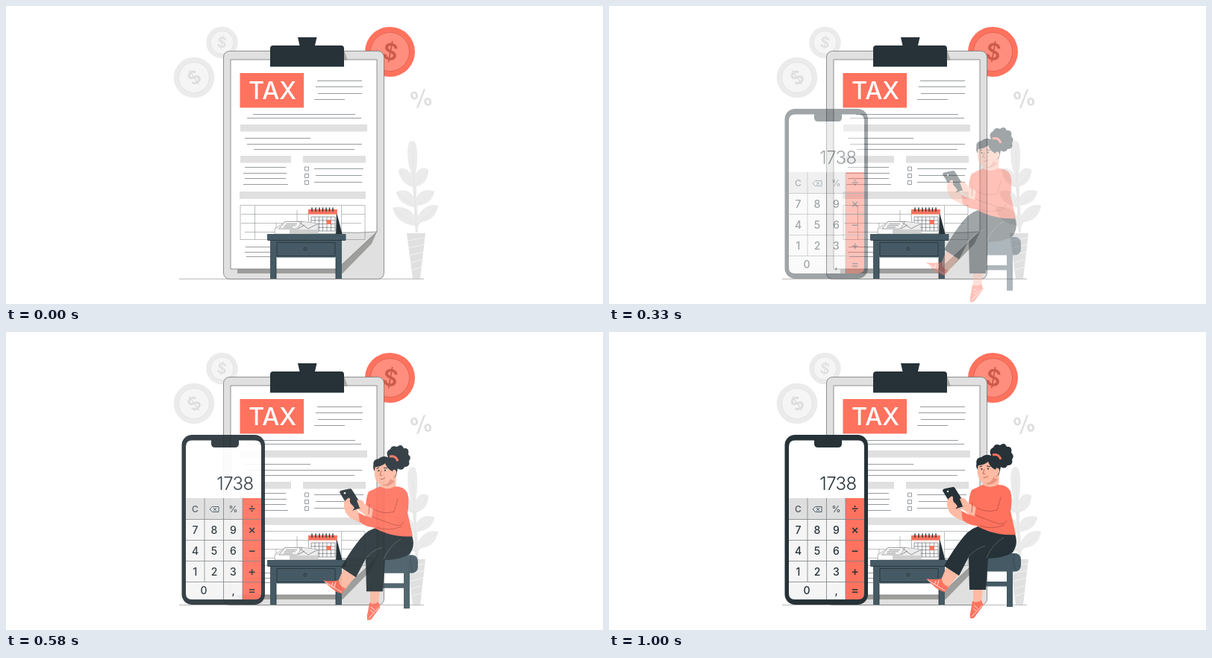
Write an HTML page that moves like this. It is 800 px wide and 400 px high and loops after 1040 ms.

```html
<!DOCTYPE html>
<html lang="en">
<head>
<meta charset="utf-8">
<title>Tax time</title>
<style>
html, body { margin: 0; width: 100%; height: 100%; overflow: hidden; background: #fff; }
svg { display: block; width: 800px; height: 400px; font-family: Inter, Lato, sans-serif; }
text { text-anchor: middle; }
.thin { fill: none; stroke: #6b7074; stroke-width: .7; }
.dark { fill: #263238; }
.red { fill: #ff725e; }
.slate { fill: #455a64; }
.skin { fill: #ffbaa3; }
.grey { fill: #e0e0e0; }
.pale { fill: #ebebeb; }
.fold { fill: none; stroke: #b94f42; stroke-width: .8; stroke-linecap: round; }
</style>
</head>
<body>
<svg viewBox="0 0 800 400">
  <!-- coins -->
  <g font-weight="600">
    <circle class="pale" cx="289.5" cy="49" r="21.3"/>
    <circle cx="289.5" cy="49" r="15.5" fill="#f5f5f5" stroke="#e0e0e0" stroke-width=".8"/>
    <text transform="translate(289.5 49) rotate(8)" y="7" font-size="20" fill="#e0e0e0">$</text>
    <circle class="pale" cx="252" cy="96" r="27.3"/>
    <circle cx="252" cy="96" r="20.5" fill="#f5f5f5" stroke="#e0e0e0" stroke-width=".8"/>
    <text transform="translate(252 96) rotate(-35)" y="9" font-size="25" fill="#dedede">$</text>
    <circle class="red" cx="514.5" cy="61.5" r="33.5"/>
    <circle cx="514.5" cy="61.5" r="26" fill="#ff8e7e" stroke="#d9604f" stroke-width=".8"/>
    <text transform="translate(515 61.5) rotate(10)" y="11" font-size="31" fill="#cc5b4b">$</text>
    <text transform="translate(556 124) rotate(-14)" y="11.5" font-size="31" fill="#dedede">%</text>
  </g>

  <!-- plant -->
  <path class="pale" d="M545 181C537 181 537 196 540 215L543 226C538 218 530 216 526 220C527 232 534 240 545 243L546 256C541 247 530 245 523 250C525 261 535 268 547 270V282C541 270 528 268 518 271C521 285 532 293 548 295L549 304H552C552 297 552 294 556 290C569 289 577 281 579 268C570 265 559 269 552 282L551 268C563 267 572 261 574 249C566 245 555 247 550 257V242C560 240 566 232 566 220C560 215 553 218 549 226C552 209 553 181 545 181Z"/>
  <path d="M545 195L550 304M527 221L546 243M566 220L549 242M523 250L547 270M574 249L551 268M519 272L549 295M579 268L552 293" fill="none" stroke="#e2e2e2" stroke-width=".8"/>
  <path class="grey" d="M537 305H562L555 366H545Z"/>
  <path d="M538 315L561 311M539 325L560 320M540 335L559 330M542 345L558 340M543 355L557 350" stroke="#f2f2f2"/>

  <path d="M232 366.4H560" stroke="#a5a5a5" stroke-width=".8"/>

  <!-- clipboard -->
  <rect x="291.5" y="60.5" width="215" height="306" rx="8" class="grey" stroke="#777" stroke-width=".8"/>
  <path d="M310 353H440L497 303L490 319L451 359H310Z" fill="#9e9f9c"/>
  <path d="M301 72H497V303L443 353H301Z" fill="#fff" stroke="#777" stroke-width=".8"/>
  <path class="grey" d="M446 304Q472 305 497 303L447 350Z" stroke="#777" stroke-width=".7"/>
  <path d="M453 59L458 73H453Z" fill="#a9a9a9"/>
  <path class="dark" d="M391 42H416.500L414 53H449Q453 53 453 57V81.500H354V57Q354 53 358 53H393.500Z"/>
  <path class="grey" d="M314 159H484V168.500H314ZM314 201H382V210.500H314ZM398 201H482V210.500H398ZM313 249H482V259H313Z"/>
  <path class="red" d="M313.500 90H399V136.500H313.500Z"/>
  <text x="357" y="125.300" font-size="32.500" font-weight="500" fill="#fff">TAX</text>
  <path class="thin" d="M417 100.500H477M415 108.500H478M418 117.500H477M413 125.500H454M331 145.500H468M323 150.500H476M320 177.500H408M323 185.500H477M332 192.500H467M320 216.500H375M318 224.500H376M320 231.500H375M318 239.500H378M413 218.500H479M415 227.500H477M413 236.500H477M321 323.500H355M320 330.500H354M322 336.500H355"/>
  <path class="thin" d="M400.500 216H405.500V221H400.500ZM400.500 225.500H405.500V230.500H400.500ZM400.500 234.500H405.500V239.500H400.500Z"/>
  <path class="thin" stroke-opacity=".65" d="M314 267.500H481V313.500H314ZM333.500 268V313M362 291V303M390 274V291M449.500 268V303M315 279.500H405M315 291.500H370M320 303.500H360M450 279.500H481M450 291.500H476"/>

  <!-- desk -->
  <g class="slate">
    <path d="M354 313H362V366H354ZM442 313H450V366H442ZM355 313H449V337.500H355Z"/>
    <path d="M350 306H455.500V314.500H350Z"/>
  </g>
  <path d="M351 314.500H455M363 317.500H441V335.500H363ZM362 338V366M442 338V366" fill="none" stroke="#263238" stroke-width=".8"/>
  <circle cx="401" cy="326" r="2" fill="none" stroke="#263238" stroke-width=".8"/>

  <!-- papers and calendar -->
  <path class="dark" d="M442 273L450.500 306H441Z"/>
  <path d="M405 279H443L442 305.500H407Z" fill="#fff" stroke="#777" stroke-width=".6"/>
  <path class="red" d="M405 273H444L443.500 279.500H405Z"/>
  <path d="M410 270.500V276M415 270.500V276M420 270.500V276M424.500 270.500V276M429 270.500V276M433.500 270.500V276M438 270.500V276" stroke="#263238" stroke-width="1.400"/>
  <path class="thin" d="M409 283H441V302H409ZM409 287.800H441M409 292.500H441M409 297.300H441M414 283V302M419.500 283V302M424.500 283V302M430 283V302M435.500 283V302" stroke="#263238"/>
  <path class="red" d="M429.500 287H435.500V293H429.500Z"/>
  <path d="M360 299L373 290L396 289L418 292V305.500H360Z" fill="#ececec" stroke="#888" stroke-width=".5"/>
  <path d="M361 300H380V305.500H361Z" fill="#fff"/>
  <path d="M380 300H418V305.500H380Z" fill="#cfcfcf"/>
  <path d="M366 299L374 289.500H397L390 299Z" fill="#f7f7f7" stroke="#777" stroke-width=".6"/>
  <path class="thin" d="M375 292.500H390M373 294.800H388M372 297H384M393 290.500L405 299L418 292M391 299L400 294"/>

  <!-- phone -->
  <g id="phone">
    <rect class="dark" x="235.500" y="138" width="111.500" height="228" rx="14"/>
    <path d="M241 223V154Q241 145.500 249 145.500H275V150Q275 155 280 155H307Q312 155 312 150V145.500H334Q342 145.500 342 154V223Z" fill="#fff"/>
    <path d="M241 223H317V359H249Q241 359 241 351Z" fill="#f5f5f5"/>
    <path d="M241 223H317V251.500H241Z" fill="#dedede"/>
    <path class="red" d="M317 223H342V351Q342 359 334 359H317Z"/>
    <path d="M241 251.500H342M241 279.500H342M241 307.500H342M241 335.500H342M266 223V335.500M291.500 223V359M317 223V359" fill="none" stroke="#7b8185" stroke-width=".8"/>
    <text x="307" y="211.500" font-size="24" font-weight="300" letter-spacing="-.6" fill="#263238">1738</text>
    <g id="keys" class="dark" font-weight="500"></g>
    <path d="M273 238L276.500 234.500H285V241.500H276.500ZM278 236.200L282 240M282 236.200L278 240" fill="none" stroke="#455a64"/>
  </g>

  <!-- woman on a stool -->
  <g id="woman">
    <path class="slate" d="M533 317H541V369H533ZM503 335H534V341.500H503Z"/>
    <rect class="slate" x="496" y="297" width="56" height="24.500" rx="8"/>
    <path d="M543 298Q540 309 546 321" fill="none" stroke="#37474f"/>

    <path class="skin" d="M488 342H501L499 365H488Z"/>
    <path class="red" d="M487 361Q492 365 499 360L501.500 367L489 384L484 384.500Q483 379 485 373Z"/>
    <path d="M489 367L494 371M488 371L492 374M486 382L500 367" fill="none" stroke="#fff" stroke-width=".8"/>
    <path class="skin" d="M453 314L469 325L454 344L443 337Z"/>
    <path class="red" d="M425 331Q434 333 446 331Q446 339 455 342L450 349Q441 347 433 339Z"/>
    <path d="M438 334L436 339M442 333L440 340M427 333L450 347" fill="none" stroke="#fff" stroke-width=".8"/>
    <path class="dark" d="M501 260Q525 262 544 271Q549 284 541 296Q530 303 508 304L505 346H483L482 302L469 327L449 314Q461 292 475 275Q486 261 501 260Z"/>
    <path d="M482 302Q490 291 504 287M529 276Q514 284 506 303" fill="none" stroke="#5c666b" stroke-width=".8"/>

    <path class="skin" d="M502 188H523L522 211Q510 218 501 208Z"/>
    <path class="red" d="M501 205Q511 211 521 205Q534 205 538 214Q541 224 538 240L545 272Q517 274 492 260Q482 259 476 254L468 250L472 240L482 245Q481 222 486 212Z"/>
    <path class="skin" d="M453 227Q456 219 460 223L466 230L472 239L474 253Q464 250 458 244Q452 237 453 227Z"/>
    <path class="skin" d="M467 223Q474 220 481 229L494 237L491 247Q482 246 477 240Q469 237 467 223Z"/>
    <path class="dark" d="M447 213Q447 211 449 210.500L461 208Q463 208 464 210L477 231Q477 233 475 234L464 237.500Q462 237.500 461 236Z"/>
    <circle cx="454" cy="214" r="1.200" fill="#fff"/>
    <path class="skin" d="M454 225Q460 218 461 222Q460 227 464 230L467 234L463 239L455 236ZM470 224Q477 221 480 228L483 235L474 234Z"/>
    <path class="red" d="M492 234Q508 243 520 239L525 222Q531 207 537 215Q542 232 535 251Q531 260 519 256L490 246Z"/>
    <path class="fold" d="M525 222L520 239Q506 243 493 236M491 246L518 256Q529 260 533 253M497 260Q512 266 530 259M486 242L487 229"/>

    <path class="dark" d="M497 171Q503 162 512 166Q508 158 515 155Q517 149 524 152Q530 147 533 154Q541 153 539 162Q544 166 540 171Q542 179 534 179Q531 185 525 181L523 190Q519 197 513 191L494 185Q489 178 497 171Z"/>
    <path d="M514 165Q522 163 525 171" fill="none" stroke="#ff725e" stroke-width="3"/>
    <path class="skin" d="M496 176Q504 175 508 172Q512 181 517 183Q524 181 523 188Q521 194 517 194Q514 203 504 203Q496 202 494 191Q493 182 496 176Z"/>
    <path d="M515 195Q512 203 504 203Q512 208 521 198Z" fill="#e99580"/>
    <path class="dark" d="M493 179Q490 169 499 168Q509 164 516 173Q521 178 518 185Q511 182 508 174Q503 179 493 179Z"/>
    <circle class="dark" cx="499.500" cy="184" r="1.100"/>
    <circle class="dark" cx="508" cy="183.500" r="1.100"/>
    <path d="M496.500 181L500 180M506 180L511 180.500" stroke="#263238" stroke-width="1"/>
    <path class="fold" d="M503 184L501 190L504 190.500M502 195.500Q506 196 508 193.500"/>
  </g>
</svg>
<script>
const el = id => document.getElementById(id);

const rows = [[242, "C %÷", 12], [271, "789×", 14], [299, "456−", 14], [327, "123+", 14], [352, "0 ,=", 14]];
const columns = [253.5, 279, 304.5, 329.7];
el("keys").innerHTML = rows.map(([y, keys, size], row) =>
  [...keys].map((key, i) => {
    const x = key === "0" ? 265 : columns[i];
    const fontSize = i === 3 ? 16 : size;
    const tint = row || i === 3 ? "" : ' fill-opacity=".8"';
    return key === " " ? "" : `<text x="${x}" y="${y}" font-size="${fontSize}"${tint}>${key}</text>`;
  }).join("")).join("");

const LOOP = 1040, START = 130, STEP = 1000 / 24, FADE_STEPS = 12;

function draw(now) {
  // Poses are held at 24 per second.
  const step = Math.floor((now % LOOP - START + 9) / STEP);
  const opacity = step < 0 ? 0 : Math.min(1, (step + .4) / (FADE_STEPS + .4));
  const rise = step < FADE_STEPS
    ? 22 - 1.8 * step
    : -Math.sin(Math.min(1, (step - FADE_STEPS) / 9) * Math.PI);
  el("phone").style.opacity = el("woman").style.opacity = opacity;
  el("woman").setAttribute("transform", `translate(0 ${rise})`);
}

const begin = performance.now();
function tick() {
  draw(performance.now() - begin);
  requestAnimationFrame(tick);
}
tick();
</script>
</body>
</html>
```
